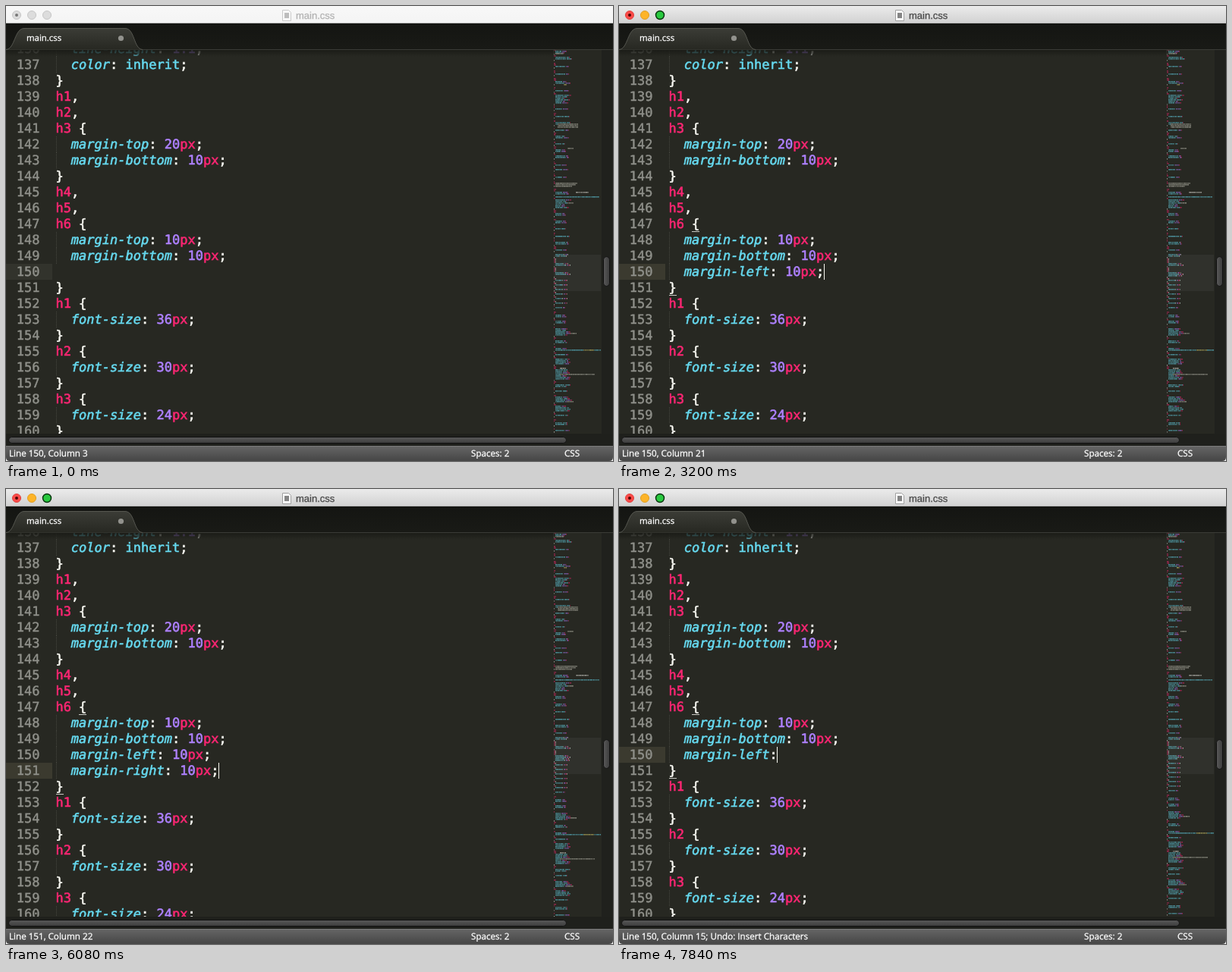
These frames come from a looping animation (800 px wide and 600 px high, 8000 ms). An HTML page with a canvas:

```html
<!DOCTYPE html>
<html lang="en">
<head>
<meta charset="utf-8">
<title>Editor</title>
<style>
  html, body { margin: 0; width: 100%; height: 100%; overflow: hidden; background: #272822; }
  #stage { position: absolute; left: 0; top: 0; width: 800px; height: 600px; overflow: hidden; }
  svg, canvas { position: absolute; left: 0; top: 0; display: block; }
  #map { left: 722px; top: 58px; }
  text { text-rendering: geometricPrecision; fill: currentColor; stroke: currentColor; stroke-width: .3px; }
  tspan { fill: currentColor; stroke: currentColor; }
  #code text { font: 17px "DejaVu Sans Mono", monospace; white-space: pre; stroke-width: .6px; }
  #code .num { color: #8f908a; stroke-width: .45px; }
  .tag { color: #f92672; }
  .prop { color: #66d9ef; font-style: italic; }
  .val { color: #66d9ef; }
  .digit { color: #ae81ff; }
  .punct { color: #f8f8f2; }
  .ui { font-family: "Open Sans", "Noto Sans", sans-serif; color: #fff; }
  .title { font: 13px "Liberation Sans", Arial, sans-serif; color: #b4b4b4; }
  .light { fill: #dcdcdc; stroke: #c6c6c6; }
  .dot { fill: #777; }
  #bar { fill: url(#barOff); }
  #icon { opacity: .5; }
  #row { fill: #32332c; }
  .on #bar { fill: url(#barOn); }
  .on .title { color: #4c4c4c; }
  .on #icon { opacity: 1; }
  .on #row { fill: #3b3a2f; }
  .on .red { fill: #fc4a48; stroke: #e0403c; }
  .on .yellow { fill: #fdb428; stroke: #e09e20; }
  .on .green { fill: #29c83f; stroke: #06300a; stroke-width: 1.4; }
  .on .dot { fill: #4d0505; }
  .focus { visibility: hidden; }
  .on .focus { visibility: visible; }
</style>
</head>
<body>
<div id="stage">
  <svg width="800" height="600" viewBox="0 0 800 600">
    <defs>
      <linearGradient id="barOn" x2="0" y2="1"><stop stop-color="#ebebeb"/><stop offset="1" stop-color="#d1d1d1"/></linearGradient>
      <linearGradient id="barOff" x2="0" y2="1"><stop stop-color="#f8f8f8"/><stop offset="1" stop-color="#f4f4f4"/></linearGradient>
      <linearGradient id="tabs" x2="0" y2="1"><stop stop-color="#141512"/><stop offset="1" stop-color="#191a16"/></linearGradient>
      <linearGradient id="tab" x2="0" y2="1"><stop stop-color="#3b3c36"/><stop offset="1" stop-color="#272822"/></linearGradient>
      <linearGradient id="shade" x2="0" y2="1"><stop stop-color="#181914" stop-opacity=".9"/><stop offset=".55" stop-color="#20211c" stop-opacity=".75"/><stop offset="1" stop-color="#272822" stop-opacity="0"/></linearGradient>
      <linearGradient id="thumb" x2="0" y2="1"><stop stop-color="#595959"/><stop offset="1" stop-color="#3c3c3c"/></linearGradient>
      <linearGradient id="thumbV"><stop stop-color="#595959"/><stop offset="1" stop-color="#3c3c3c"/></linearGradient>
      <linearGradient id="status" x2="0" y2="1"><stop stop-color="#666"/><stop offset="1" stop-color="#464646"/></linearGradient>
      <clipPath id="pane"><rect y="57" width="721" height="507"/></clipPath>
    </defs>
    <rect width="800" height="600" fill="#272822"/>
    <g clip-path="url(#pane)">
      <rect id="row" width="61" height="21"/>
      <g id="code"></g>
      <g class="focus" fill="#c9c9c3">
        <rect x="96" y="297" width="10" height="1"/>
        <rect id="brace" x="66" width="10" height="1"/>
      </g>
      <rect id="caret" width="1" height="21" fill="#f8f8f0"/>
      <rect y="57" width="721" height="11" fill="url(#shade)"/>
    </g>
  </svg>
  <canvas id="map" width="62" height="506"></canvas>
  <svg width="800" height="600" viewBox="0 0 800 600">
    <rect x="722" y="328" width="62" height="48" fill="#fff" fill-opacity=".045"/>
    <rect x="785" y="58" width="15" height="522" fill="#20211d"/>
    <rect y="564" width="800" height="16" fill="#1f201c"/>
    <rect x="3.5" y="568.5" width="735" height="8" rx="4" fill="url(#thumb)" stroke="#111"/>
    <rect id="scroll" x="787.5" y="330.5" width="8" rx="4" fill="url(#thumbV)" stroke="#111"/>

    <rect y="580" width="800" height="20" fill="url(#status)"/>
    <path d="M0 580.5H800" stroke="#7b7b7b"/>
    <g class="ui" font-size="11.65">
      <text id="info" x="4" y="594"></text>
      <text x="613" y="594">Spaces: 2</text>
      <text x="736" y="594">CSS</text>
    </g>
    <path d="M0 595Q0 600 5 600H0ZM800 595Q800 600 795 600H800Z" fill="#eee"/>

    <rect y="23" width="800" height="34" fill="url(#tabs)"/>
    <path d="M0 57.5H800" stroke="#3b3c37"/>
    <path d="M0 57.5C12 57 11 29.5 24 29.5H157C170 29.5 168 57 180 57.5Z" fill="url(#tab)"/>
    <path d="M0 57.5C12 57 11 29.5 24 29.5H157C170 29.5 168 57 180 57.5" fill="none" stroke="#565750"/>
    <text class="ui" x="27" y="46" font-size="11.4">main.css</text>
    <circle cx="151.5" cy="42.5" r="3.6" fill="#92928d"/>

    <g id="window">
      <rect id="bar" width="800" height="23"/>
      <path d="M0 22.5H800" stroke="#b5b5b5"/>
      <circle class="light red" cx="14" cy="12" r="5.5"/>
      <circle class="light yellow" cx="34" cy="12" r="5.5"/>
      <circle class="light green" cx="54" cy="12" r="5.5"/>
      <circle class="dot" cx="14" cy="12" r="2"/>
      <g id="icon">
        <path d="M364.5 5.5H372.5L375.5 8.5V19.5H364.5Z" fill="#fafafa" stroke="#a0a0a0"/>
        <rect x="367" y="9" width="6" height="7" fill="#858585"/>
      </g>
      <text class="title" x="382" y="17">main.css</text>
    </g>
    <g id="mouse" fill="none" stroke="#d5d5d0" stroke-width="1.2">
      <path d="M-3.5-8Q0-8 0-5Q0-8 3.5-8M0-5V5M-3.5 8Q0 8 0 5Q0 8 3.5 8M-2 2.5H2"/>
    </g>
  </svg>
</div>
<script>
const $ = id => document.getElementById(id);
const LOOP = 8000, STEP = 160, ROW = 21, CH = 10.234, LEFT = 65.4, FIRST = 136, EDIT = 150;
const LEFT_RULE = 'margin-left: 10px;', RIGHT_RULE = 'margin-right: 10px;';

// [time, characters in line 150, characters in line 151 (-1: no such line), undo]
const EVENTS = [
  [0, 0, -1], [640, 0, -1], [800, 0, -1],
  [2080, 2, -1], [2400, 6, -1], [2560, 9, -1], [2720, 12, -1], [2880, 14, -1], [3200, 18, -1],
  [3360, 18, 0], [3680, 18, 4], [4000, 18, 9], [4160, 18, 12], [4320, 18, 13], [4480, 18, 14],
  [4800, 18, 15], [5120, 18, 16], [5280, 18, 18], [5760, 18, 19],
  [6880, 18, 13, 1], [7200, 18, 0, 1], [7520, 18, -1, 1], [7840, 12, -1, 1]
];

const size = (tag, px) => [tag + ' {', `  font-size: ${px}px;`, '}'];
const margins = top => [`  margin-top: ${top}px;`, '  margin-bottom: 10px;'];
const HEAD = ['  line-height: 1.1;', '  color: inherit;', '}',
  'h1,', 'h2,', 'h3 {', ...margins(20), '}', 'h4,', 'h5,', 'h6 {', ...margins(10)];
const TAIL = ['}', ...size('h1', 36), ...size('h2', 30), ...size('h3', 24),
  ...size('h4', 18), ...size('h5', 14), ...size('h6', 12)];

const KINDS = ['tag', 'prop', 'digit', 'tag', 'val', 'punct'];
function tokens(body) {
  const re = /(^h\d)|(^[a-z-]+)|(\d[\d.]*)|(px)|([a-z]+)|([^\da-z]+)/g;
  return [...body.matchAll(re)].map(m => [m[0], KINDS[m.slice(1).findIndex(g => g !== undefined)]]);
}
const split = s => s.startsWith('  ') ? [2, s.slice(2)] : [0, s];

function docLines([, a, b]) {
  const mid = ['  ' + LEFT_RULE.slice(0, a)];
  if (b >= 0) mid.push('  ' + RIGHT_RULE.slice(0, b));
  return [...HEAD, ...mid, ...TAIL];
}

function drawCode(lines) {
  let out = '';
  for (let i = 0; i < 25; i++) {
    const n = FIRST + i, top = 340 + (n - EDIT) * ROW, base = top + 16;
    const [indent, body] = split(lines[i]);
    if (indent && body) out += `<path d="M66.5 ${top}v${ROW}" stroke="#45463f" stroke-dasharray="1 1"/>`;
    out += `<text class="num" x="13.8" y="${base}">${n}</text>`;
    const spans = tokens(body).map(([s, kind]) => `<tspan class="${kind}">${s}</tspan>`).join('');
    out += `<text xml:space="preserve" x="${LEFT + indent * CH}" y="${base}">${spans}</text>`;
  }
  $('code').innerHTML = out;
}

// Overview strip: one pixel per character, two per line
const TINT = { tag: '#f92672', prop: '#66d9ef', val: '#66d9ef', digit: '#ae81ff', punct: '#f8f8f2', quote: '#e6db74', note: '#c5c5b8' };
const ctx = $('map').getContext('2d');

function random(seed) {
  return () => {
    seed = (seed * 1664525 + 1013904223) >>> 0;
    return seed / 4294967296;
  };
}

function filler(count, seed, busy) {
  const rnd = random(seed), pick = (a, b) => a + Math.floor(rnd() * (b - a + 1));
  const rows = [];
  while (rows.length < count) {
    const dense = busy(rows.length);
    for (let i = pick(1, 2); i > 0; i--) rows.push([[0, pick(1, 3), 'tag']]);
    for (let i = dense ? pick(4, 7) : pick(1, 2); i > 0; i--) {
      const w = pick(7, 14), v = pick(2, 6);
      rows.push([[2, w, 'prop'], [w + 3, v, rnd() < .6 ? 'digit' : 'val'], [w + 3 + v, dense ? pick(0, 3) : 1, 'tag']]);
    }
    rows.push([[0, 1, 'punct']]);
    if (!dense && rnd() < .5) rows.push([]);
  }
  return rows.slice(0, count);
}
const ABOVE = filler(135, 41, i => (i > 26 && i < 34) || (i > 92 && i < 103));
const BELOW = filler(90, 97, i => i % 24 > 9 && i % 24 < 20);

// [y, x, width, tint] for the rows that stand out
const ACCENTS = [
  [62, 2, 11, 'note'], [103, 13, 4, 'quote'], [155, 5, 27, 'note'], [157, 5, 27, 'note'], [159, 5, 27, 'note'],
  [187, 18, 8, 'note'], [233, 2, 29, 'note'], [235, 2, 27, 'note'], [237, 2, 22, 'note'],
  [245, 29, 17, 'punct'], [251, 2, 58, 'prop'], [259, 18, 8, 'note'],
  [431, 22, 8, 'note'], [453, 2, 60, 'prop'], [453, 39, 14, 'quote'],
  [477, 8, 8, 'punct'], [485, 8, 46, 'note'], [521, 17, 9, 'note']
];

function drawMap(lines, shift) {
  ctx.clearRect(0, 0, 62, 506);
  const rnd = random(7);
  const word = (x, y, w, tint) => {
    ctx.fillStyle = TINT[tint];
    for (let i = 0; i < w; i++) {
      ctx.globalAlpha = .3 + rnd() * .3;
      ctx.fillRect(x + i, y, 1, 1);
      ctx.globalAlpha *= .5;
      ctx.fillRect(x + i, y + 1, 1, 1);
    }
  };
  const real = lines.map(s => {
    const [indent, body] = split(s);
    let x = indent;
    return tokens(body).map(([t, kind]) => {
      const seg = [x, t.trim().length, kind];
      x += t.length;
      return seg;
    });
  });
  const rows = [...ABOVE, ...real, ...BELOW];
  rows.forEach((row, i) => row.forEach(([x, w, tint]) => word(x, 2 * i - 1, w, tint)));
  for (const [y, x, w, tint] of ACCENTS) {
    const top = y - 58 + (y > 350 ? shift : 0);
    ctx.clearRect(x, top, w, 2);
    word(x, top, w, tint);
  }
}

let shown = -1;
function show(i) {
  if (i === shown) return;
  shown = i;
  const [t, a, b, undo] = EVENTS[i], extra = b >= 0;
  const lines = docLines(EVENTS[i]);
  const line = extra ? EDIT + 1 : EDIT, col = 3 + (extra ? b : a), top = extra ? 361 : 340;
  $('stage').classList.toggle('on', t >= 640);
  drawCode(lines);
  drawMap(lines, extra ? 2 : 0);
  $('row').setAttribute('y', top);
  $('caret').setAttribute('y', top);
  $('caret').setAttribute('x', Math.floor(LEFT + (col - 1) * CH));
  $('brace').setAttribute('y', top + 41);
  $('scroll').setAttribute('height', extra ? 38 : 39);
  $('info').textContent = `Line ${line}, Column ${col}` + (undo ? '; Undo: Insert Characters' : '');
}

function render(now) {
  const t = Math.floor(now % LOOP / STEP) * STEP;
  let i = EVENTS.length - 1;
  while (EVENTS[i][0] > t) i--;
  show(i);

  const lit = t >= 640 && Math.floor((t - EVENTS[i][0]) / 480) % 2 === 0;
  $('caret').style.visibility = lit ? 'visible' : 'hidden';

  const p = Math.min(1, Math.max(0, (t - 160) / 480)), left = (1 - p) ** 2;
  $('mouse').setAttribute('transform', `translate(${306.5 + 150 * left} ${362 + 130 * left})`);
  $('mouse').style.visibility = t >= 160 && t < 2080 ? 'visible' : 'hidden';
}

function tick() {
  render(performance.now());
  requestAnimationFrame(tick);
}
tick();
</script>
</body>
</html>
```
